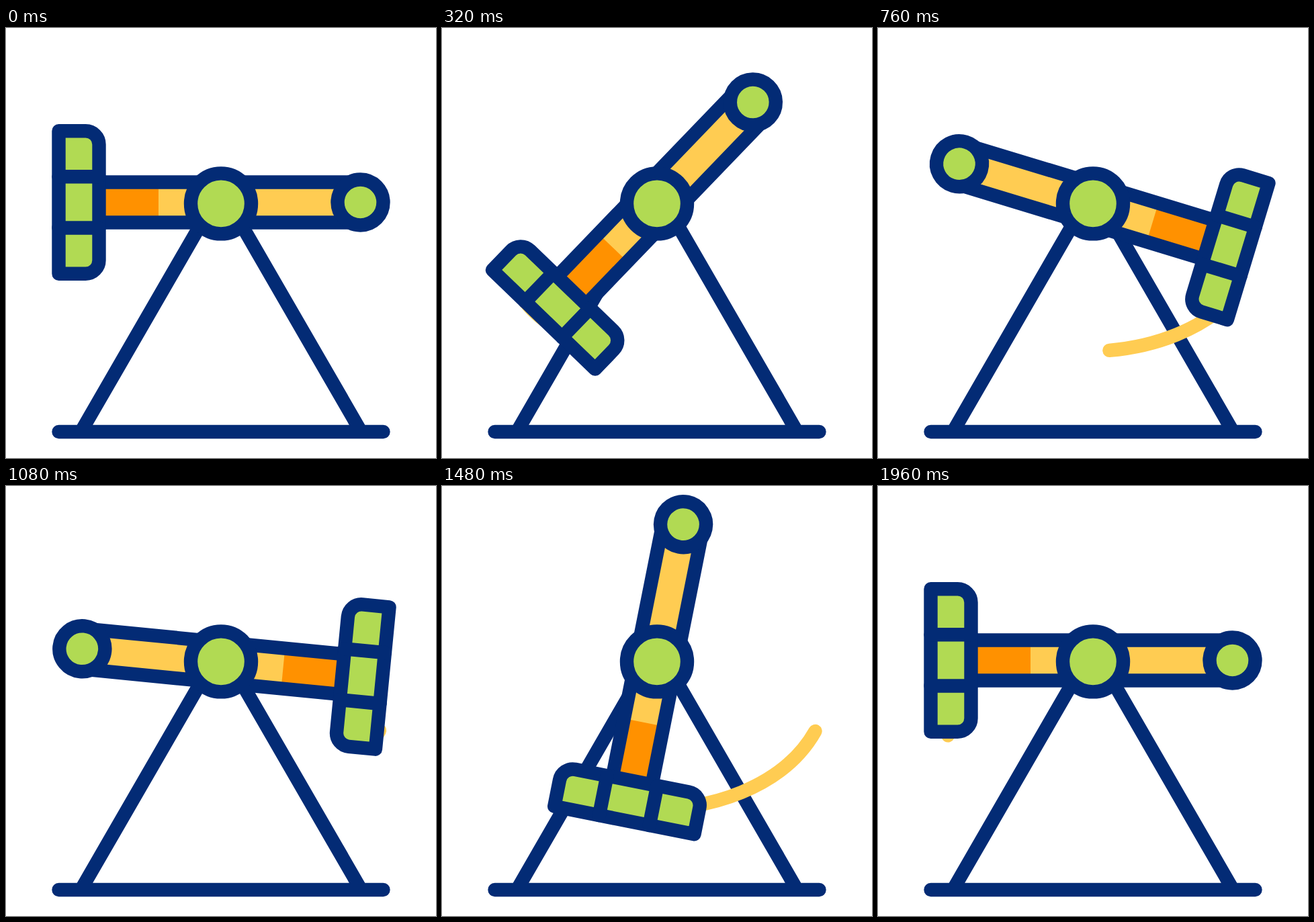
These frames come from a looping animation (640x640 px, 2 s). An HTML page:

```html
<!DOCTYPE html>
<html lang="en">
<head>
<meta charset="utf-8">
<title>Pendulum ride</title>
<style>
  html, body { margin: 0; width: 100%; height: 100%; overflow: hidden; background: #fff; }
  svg { display: block; width: 100%; height: 100%; }
  .line { fill: none; stroke: #032b75; stroke-width: 20.4; stroke-linecap: round; stroke-linejoin: round; }
  .green { fill: #b1da53; }
  .trail { fill: none; stroke: #ffcc52; stroke-width: 20.4; stroke-linecap: round; }
</style>
</head>
<body>
<svg viewBox="0 0 640 640">
  <path class="line" d="M111.5 601L308 261M528.5 601L332 261M78.5 601H561.5"/>
  <path id="trail" class="trail" pathLength="1000"/>
  <g id="arm">
    <path fill="#ffcc52" d="M140 229.5H527V289.5H140Z"/>
    <path fill="#ff9100" d="M140 229.5H227V289.5H140Z"/>
    <path class="line" d="M140 229.5H527M140 289.5H527"/>
    <circle class="line green" cx="527.5" cy="259.5" r="34"/>
    <path class="line green" d="M78.5 153.3H118.5a20 20 0 0 1 20 20V345.7a20 20 0 0 1 -20 20H78.5Z"/>
    <path class="line" d="M78.5 221.3H138.5M78.5 297.5H138.5"/>
  </g>
  <circle class="line green" cx="320" cy="261.4" r="45"/>
</svg>
<style>
  .line.green { fill: #b1da53; }
</style>
<script>
  const LOOP = 2000, STEP = 40, TICK = 1000 / 60;
  const arm = document.getElementById('arm');
  const trail = document.getElementById('trail');
  trail.setAttribute('d', 'M104 371C155 519 470 519 556 364');

  // Eased progress between two ticks of a 60 per second clock
  function ease(t, from, to) {
    const s = Math.min(1, Math.max(0, (t / TICK - from) / (to - from)));
    return s * s * (3 - 2 * s);
  }

  function draw(t) {
    const out = ease(t, 1, 56), back = ease(t, 59, 114);
    arm.setAttribute('transform', `rotate(${-180 * (out - back)} 320 261)`);

    // The trail follows the cabin; its tail leaves later and catches up
    const returning = back > 0;
    const head = returning ? back : out;
    const tail = returning ? ease(t, 88, 118) : ease(t, 30, 60);
    const length = 1000 * (head - tail);
    const start = 1000 * (returning ? 1 - head : tail);
    trail.style.display = length > 0 ? '' : 'none';
    trail.setAttribute('stroke-dasharray', `${Math.max(length, 0.01)} 3000`);
    trail.setAttribute('stroke-dashoffset', -start);
  }

  const begin = performance.now();
  function tick() {
    const t = (performance.now() - begin) % LOOP;
    draw(Math.floor(t / STEP) * STEP);
    requestAnimationFrame(tick);
  }
  draw(0);
  requestAnimationFrame(tick);
</script>
</body>
</html>
```
